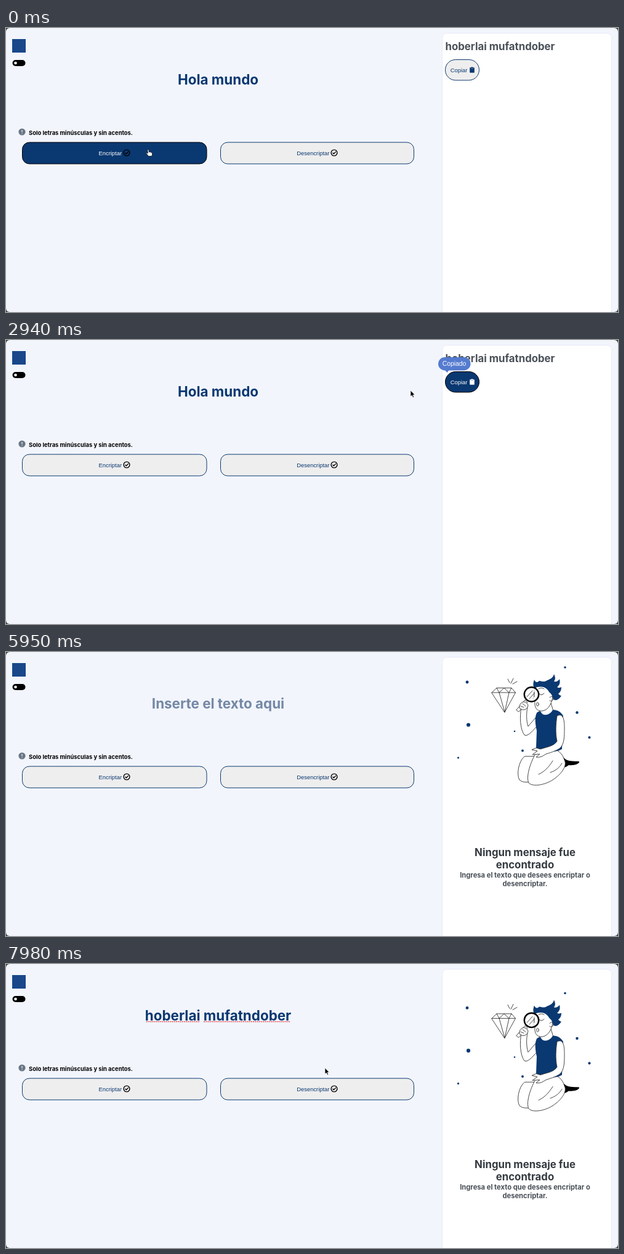
Write an HTML page that moves like this. It is 994 px wide and 462 px high and loops after 8000 ms.

```html
<!DOCTYPE html>
<html lang="es">
<head>
<meta charset="utf-8">
<title>Encriptador</title>
<style>
  html, body { margin: 0; width: 100%; height: 100%; overflow: hidden; background: #444; }
  svg { display: block; width: 994px; height: 462px; }
  text { font-family: Inter, sans-serif; font-weight: 700; }
  .ui { font-family: "Liberation Sans", Arial, sans-serif; font-weight: 400; font-size: 9.4px; }
  .mid { text-anchor: middle; }
  .big { font-size: 22.4px; }
  .button { --ink: #0a3871; }
  .button rect { fill: #eee; stroke: #0a3871; }
  .button .ink { fill: var(--ink); }
  .button.active { --ink: #fff; }
  .button.active rect { fill: #0a3871; stroke: #000; }
  .line { fill: #fff; stroke: #333; stroke-width: .9; stroke-linejoin: round; stroke-linecap: round; }
  .open { fill: none; }
  .navy { fill: #0a3871; }
</style>
</head>
<body>
<svg viewBox="0 0 994 462">
  <defs>
    <g id="check" fill="none" stroke="#000" stroke-width="1.4" stroke-linecap="round" stroke-linejoin="round">
      <circle r="4.9"/><path d="M-2.2 .2L-.6 1.8L2.3-1.4"/>
    </g>
  </defs>

  <rect width="994" height="462" fill="#444"/>
  <rect width="994" height="462" rx="6" fill="#f2f5fc"/>
  <path d="M708.5 462V16a7.5 7.5 0 0 1 7.5-7.5H976a7.5 7.5 0 0 1 7.5 7.5V462" fill="#fff" stroke="#e6ecf6"/>

  <rect x="10" y="18" width="22" height="22" fill="#19478a"/>
  <rect x="10.5" y="52" width="21" height="10" rx="5"/>
  <circle cx="15.5" cy="57" r="2.3" fill="#fff"/>

  <rect id="selection" x="280" y="70" width="129.5" height="27" fill="#b2d4fd"/>
  <text id="entry" class="big mid" x="344.5" y="91.5"></text>
  <path id="spelling" d="M228 93.7H315M321 93.7H462" stroke="#e5484d" stroke-width="1.4" stroke-dasharray="2 1.2"/>
  <path id="caret" d="M0 71V96" stroke="#333"/>

  <circle cx="26" cy="169" r="5.6" fill="#6b7785"/>
  <path d="M26 166V169.5M26 171.3V172.2" stroke="#f2f5fc" stroke-width="1.2"/>
  <text x="37" y="174.4" font-size="9.4">Solo letras minúsculas y sin acentos.</text>

  <g id="encrypt" class="button">
    <rect x="26.5" y="186" width="299.5" height="35" rx="11.5"/>
    <text class="ui ink" x="150.5" y="207">Encriptar</text>
    <use href="#check" x="196" y="203"/>
  </g>
  <g class="button">
    <rect x="348.5" y="186" width="314" height="35" rx="11.5"/>
    <text class="ui ink" x="472.3" y="207">Desencriptar</text>
    <use href="#check" x="533" y="203"/>
  </g>

  <g id="result">
    <text x="713.5" y="35.8" font-size="16.8" fill="#495057">hoberlai mufatndober</text>
    <g id="copy" class="button">
      <rect x="713.5" y="51.5" width="55" height="33.5" rx="16.7"/>
      <text class="ui ink" x="721.8" y="71.5">Copiar</text>
      <path class="ink" d="M754 64.3H755.3a1.7 1.7 0 0 1 3.2 0H760a.8.8 0 0 1 .8.8V72a.8.8 0 0 1-.8.8H754a.8.8 0 0 1-.8-.8V65.1a.8.8 0 0 1 .8-.8Z"/>
      <path d="M755.2 65.8H758.8" stroke="#8295b4" stroke-width=".8"/>
    </g>
    <g id="tooltip" fill="#557bd0">
      <path d="M711 47L716.5 53L721 47Z"/>
      <rect x="702" y="28" width="52.5" height="21.5" rx="10.7"/>
      <text class="ui mid" x="728" y="42.4" style="font-size:10.4px" fill="#fff">Copiado</text>
    </g>
  </g>

  <g id="empty">
    <g id="art">
      <g id="dots" class="navy"></g>
      <path class="line" d="M789 66L797 58.5H821L827.5 66L810 98ZM789 66H827.5M797 58.5L801 66L810 98L817 66L821 58.5M801 66L809 58.5L817 66"/>
      <path class="line open" d="M815 44L818 50M824 43L820 51M830 48L823 52"/>

      <path class="line" d="M842 170C832 178 829 200 834 208C840 214 852 212 866 208L890 170Z"/>
      <path d="M898 187L906 172C912 179 922 177 931 178C932 182 922 185 914 184C909 188 904 189 898 187Z"/>
      <path class="line" d="M862 162C852 178 844 203 849 213C856 220 876 216 888 208C902 199 912 185 907 176C904 165 896 157 882 157Z"/>
      <path class="line open" d="M888 177C880 190 872 196 865 199M903 181C898 190 890 194 884 196"/>

      <path class="line" d="M837 90C834 105 835 126 842 135C847 138 854 130 862 121L860 107L848 121C845 112 845 99 847 90Z"/>
      <path class="line" d="M866 91L868 105C876 109 886 104 889 96L884 80Z"/>
      <path class="line" d="M859 57C857 67 857 72 856 77L859 79C858 89 861 96 870 96C879 95 884 88 887 78L889 60C882 48 865 46 859 57Z"/>
      <path class="line open" d="M866 68Q870 72 874 67M865 60Q869 57 874 60M883 74Q889 69 889 76Q887 82 883 79"/>
      <ellipse class="line" cx="863.5" cy="85" rx="1.8" ry="3"/>
      <path class="navy" d="M858 59C855 53 857 48 858 45C860 50 863 50 866 47C872 48 875 49 879 46C885 44 889 41 890 36C893 42 892 45 890 48C894 49 897 47 899 44C901 51 898 55 895 57C898 59 900 58 902 57C902 64 899 66 897 68C900 71 901 71 902 71C898 78 892 80 889 77C888 72 886 68 882 65C878 57 869 54 858 59Z"/>

      <path class="navy" d="M862 99C866 96 868 96 869 98C872 105 884 103 888 94C896 94 902 98 905 104L903 158C891 165 872 163 861 156L862 128C860 118 858 107 862 99Z"/>
      <path class="line" d="M895 104C904 99 907 108 907 123C907 138 907 150 899 157C891 162 883 164 877 166C871 170 867 172 861 171L867 166L855 167L863 161L854 159L861 156L868 158L878 155C886 153 892 150 895 145C892 131 893 117 895 104Z"/>

      <path class="line" d="M829 94L843 78L847 82L833 97Z"/>
      <path class="line" d="M834 91Q833 84 840 81Q846 81 848 87Q846 95 839 94Z"/>
      <path class="line open" d="M836 88L841 90M839 84L844 88"/>
      <circle cx="853.5" cy="69" r="11.7" fill="#fff" fill-opacity=".75" stroke="#000" stroke-width="2.4"/>
      <path class="line open" d="M846 73L855 63M850 76L858 67M858 65V73"/>
    </g>
    <g class="mid" fill="#343a40">
      <text x="843" y="332" font-size="16.8">Ningun mensaje fue</text>
      <text x="843" y="352.3" font-size="16.8">encontrado</text>
      <g fill="#495057" font-size="11.2">
        <text x="843" y="367">Ingresa el texto que desees encriptar o</text>
        <text x="843" y="380.5">desencriptar.</text>
      </g>
    </g>
  </g>

  <g id="pointer">
    <path id="arrow" d="M0 0V10L2.3 8L4 11.5L5.6 10.7L4 7.3H7Z" stroke="#fff" stroke-width=".7"/>
    <path id="hand" d="M-1.2 .8C-1.2-.6 .8-.6 .9 .8L1.3 4L2.8 3.6L4.4 4.2L6 4.8C7 6 6.6 8.5 5.6 10.5H.4C-.8 8.8-2.2 7.2-3.2 6C-3.4 4.8-2 4.6-.6 6Z" fill="#fff" stroke="#111" stroke-width=".8"/>
    <path id="beam" d="M-2.5-5Q0-5 0-3.5Q0-5 2.5-5M0-3.5V3.5M-2.5 5Q0 5 0 3.5Q0 5 2.5 5M-1 1.5H1" fill="none" stroke="#222"/>
  </g>
</svg>

<script>
const LOOP = 8000;
const SELECT = 4480, CLEAR = 5110, PASTE = 6400;
const $ = id => document.getElementById(id);
const show = (id, on) => $(id).style.display = on ? "" : "none";
const ease = p => (1 - Math.cos(Math.PI * p)) / 2;

// time, x, y of the pointer tip
const route = [
  [0, 231, 198], [350, 231, 198], [1350, 741, 78], [2350, 741, 78],
  [2900, 657, 82], [3430, 657, 82], [4130, 445, 97],
  [7300, 445, 97], [7900, 518, 169], [8000, 518, 169]
];
const dots = [
  [749, 49, 2.4], [751, 118.5, 3.1], [734.5, 172, 1.6], [826, 129, 1.3],
  [839, 160.5, 2], [908, 25, 1.8], [927.5, 98.5, 2.2], [947.5, 139, 2.1]
];
$("dots").innerHTML = dots.map(([x, y, r]) => `<circle cx="${x}" cy="${y}" r="${r}"/>`).join("");

function pointerAt(t) {
  const i = route.findIndex(([end]) => end > t);
  const [t0, x0, y0] = route[i - 1], [t1, x1, y1] = route[i];
  const p = ease((t - t0) / (t1 - t0));
  return [x0 + (x1 - x0) * p, y0 + (y1 - y0) * p];
}

function drawPointer(t) {
  const [x, y] = pointerAt(t);
  const inside = (l, top, r, b) => x > l && x < r && y > top && y < b;
  const onEncrypt = inside(26, 186, 326, 221);
  const onCopy = inside(713, 51, 769, 85);
  const onEntry = inside(20, 65, 640, 150);
  show("pointer", t < CLEAR || t >= 7300);
  show("hand", onEncrypt || onCopy);
  show("beam", onEntry);
  show("arrow", !onEncrypt && !onCopy && !onEntry);
  $("pointer").setAttribute("transform", `translate(${x} ${y})`);
  $("encrypt").classList.toggle("active", onEncrypt);
  $("copy").classList.toggle("active", onCopy || (t > 1950 && t < 4130));
}

function draw(t) {
  const cleared = t >= CLEAR, pasted = t >= PASTE;
  const entry = $("entry");
  entry.textContent = pasted ? "hoberlai mufatndober" : cleared ? "Inserte el texto aqui" : "Hola mundo";
  entry.setAttribute("fill", cleared && !pasted ? "#7488a5" : "#0a3871");
  show("selection", t >= SELECT && !cleared);
  show("spelling", pasted);
  show("caret", cleared && (t - (pasted ? PASTE : CLEAR)) % 1000 < 500);
  $("caret").setAttribute("transform", `translate(${pasted ? 462.5 : 344.5} 0)`);
  show("result", !cleared);
  show("empty", cleared);
  show("tooltip", t >= 1960 && t < 3850);
  $("art").setAttribute("transform", `translate(0 ${27.5 * ease((t - CLEAR) / 3100) - 4.7})`);
  drawPointer(t);
}

function tick() {
  draw(performance.now() % LOOP);
  requestAnimationFrame(tick);
}
tick();
</script>
</body>
</html>
```
